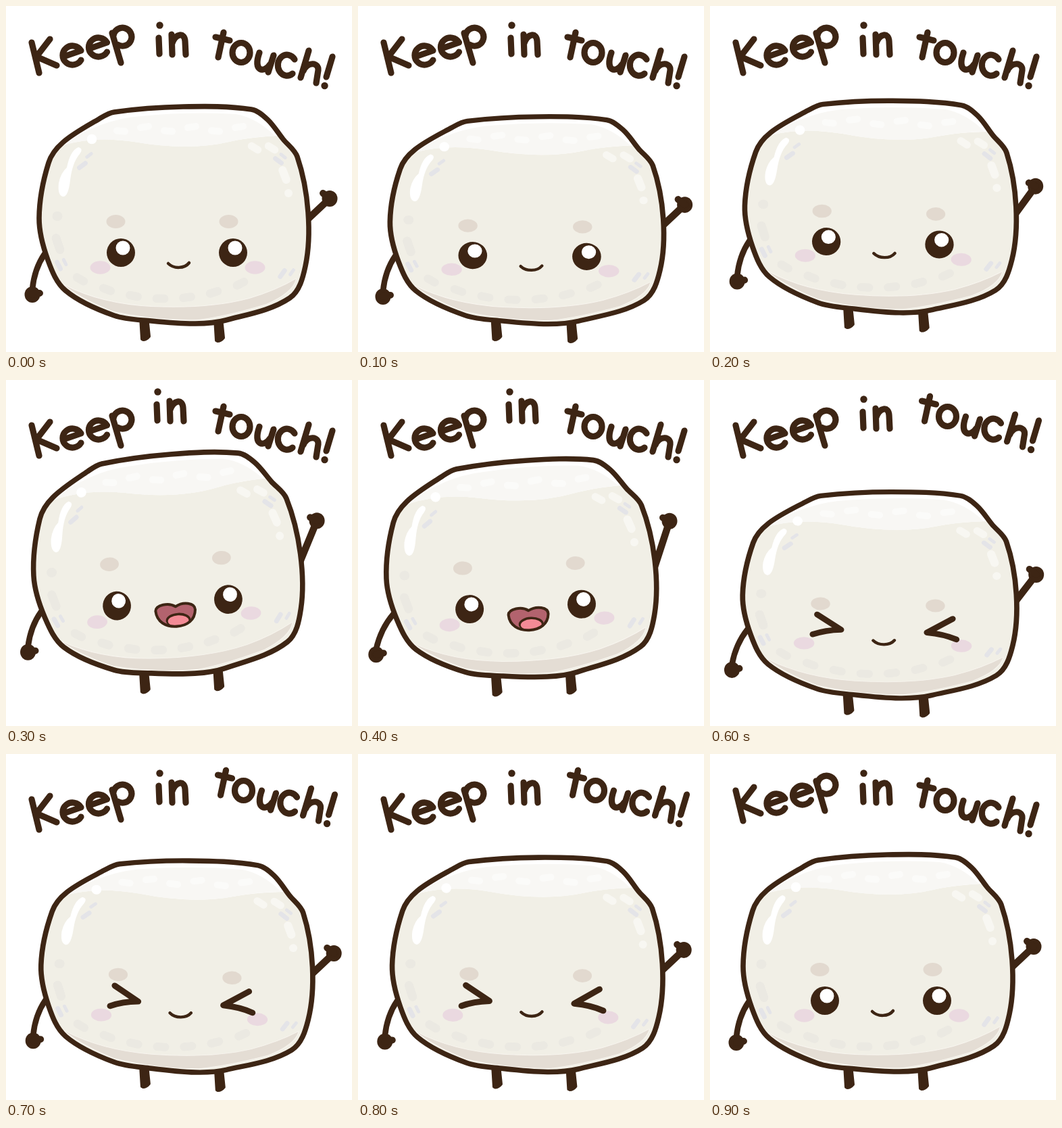
These frames come from a looping animation (512x512 px, 1 s). An HTML page with a canvas:

```html
<!DOCTYPE html>
<html lang="en">
<head>
<meta charset="utf-8">
<title>Keep in touch!</title>
<style>
html, body { margin: 0; width: 100%; height: 100%; overflow: hidden; background: #fff; }
canvas { display: block; width: 512px; height: 512px; }
</style>
</head>
<body>
<canvas id="stage" width="512" height="512" role="img" aria-label="Keep in touch!"></canvas>
<script>
const ctx = document.getElementById('stage').getContext('2d');
const INK = '#3d2514';
const STEP = 100, STEPS = 10;
const PIVOT = [250, 475];

// Hop: lift, tilt, vertical stretch; the body is at rest afterwards
const hop = [
  [0, 0, 1], [0, .01, .955], [17, .026, .976], [34, -.058, 1.015], [29.6, -.045, 1],
  [0, .003, .955], [0, .018, .95], [0, .029, .974], [0, .015, .988]
];

// Smooth rise and fall around a centre
const bump = (t, centre, half) =>
  Math.abs(t - centre) < half ? Math.cos(Math.PI * (t - centre) / (2 * half)) ** 2 : 0;

// Closed smooth curve; handles are a third of each side
function loop(pts) {
  const path = new Path2D(), n = pts.length, at = i => pts[(i + n) % n];
  const heading = i => Math.atan2(at(i + 1)[1] - at(i - 1)[1], at(i + 1)[0] - at(i - 1)[0]);
  path.moveTo(...pts[0]);
  pts.forEach(([x, y], i) => {
    const [u, v] = at(i + 1), h = Math.hypot(u - x, v - y) / 3;
    const a = heading(i), b = heading(i + 1);
    path.bezierCurveTo(x + h * Math.cos(a), y + h * Math.sin(a),
      u - h * Math.cos(b), v - h * Math.sin(b), u, v);
  });
  return path;
}

const body = loop([
  [160, 157], [262, 149], [363, 153], [387, 168], [410, 197], [431, 223], [447, 305],
  [443, 385], [420, 432], [325, 465], [280, 470], [215, 466], [160, 458], [88, 421],
  [62, 376], [49, 314], [63, 232], [84, 202], [138, 167]
]);

const capEdge = 'Q360 194 330 201 Q270 215 190 201 Q130 192 84 206 Z';
const rim = new Path2D('M84 206 V140 H404 V192 ' + capEdge);
const cap = new Path2D('M84 206 Q140 167 200 163 Q270 156 340 160 Q370 165 398 192 ' + capEdge);
const shade = new Path2D('M86 413 Q140 441 215 445 Q300 449 360 433 Q400 421 429 404 Q424 424 385 441 Q325 459 285 464 Q225 466 160 452 Q115 435 86 413 Z');
const streak = new Path2D('M107 209 Q115 211 109 219 Q98 232 95 258 Q92 283 84 282 Q76 280 78 262 Q81 247 90 239 Q95 214 107 209 Z');
const smile = new Path2D('M240 381 C248 389 264 389 271 380');
const mouth = new Path2D('M227 376 C228 367 247 364 257 371 C269 364 286 367 286 377 C285 392 273 400 257 400 C241 400 228 392 227 376 Z');
const squint = new Path2D('M158 342 L193 365 Q170 366 152 373 M355 345 L318 367 Q343 369 361 377');
const leg = new Path2D('M-6 -6 H4 L7 23 Q3 28 -2 28 L-4 27 Z');

const e = (x, y) => `M${x - 13} ${y + 4} l26 -9 a14.5 14 0 1 0 0 14 `;
const words = [
  { line: new Path2D('M38 67 L49 112 M65 62 L45 88 L75 101 ' + e(98, 84) + e(136.5, 72) +
      'M157 53 L170 97 M159 57 a13.5 13.5 0 1 1 6 13'),
    lift: [0, -13] },
  { line: new Path2D('M226 47 L227 71 M245 42 L246 72 M246 55 C251 41 264 38 265 52 L266 72'),
    dot: [227.5, 28.5], lift: [-3, -11] },
  { line: new Path2D('M322 39 L314 76 M310 46 L331 51 M335 69 a13 14.5 0 1 0 26 0 a13 14.5 0 1 0 -26 0 ' +
      'M375 69 C365 97 382 100 391 86 M396 73 L388 98 M427 79 a13.5 15.5 0 1 0 -3 21 ' +
      'M448 66 L436 106 M440 96 C447 81 463 84 462 95 L459 114 M483 75 L474 105'),
    dot: [471.5, 118], lift: [3.5, -15] }
];

function ellipse(x, y, rx, ry, color) {
  ctx.fillStyle = color;
  ctx.beginPath();
  ctx.ellipse(x, y, rx, ry, 0, 0, Math.PI * 2);
  ctx.fill();
}

function stroke(path, width, color = INK) {
  ctx.lineWidth = width;
  ctx.strokeStyle = color;
  ctx.stroke(path);
}

function fill(path, color) {
  ctx.fillStyle = color;
  ctx.fill(path);
}

function grain(x, y, w, h, angle, color) {
  ctx.save();
  ctx.translate(x, y);
  ctx.rotate(angle);
  ctx.fillStyle = color;
  ctx.beginPath();
  ctx.roundRect(-w / 2, -h / 2, w, h, h / 2);
  ctx.fill();
  ctx.restore();
}

// A long and a short mark side by side
function hatch(x, y, angle, dx, dy) {
  grain(x, y, 18, 7, angle, '#e4e4e8');
  grain(x + dx, y + dy, 13, 5, angle, '#e4e4e8');
}

function drawRice() {
  const light = 'rgba(255, 255, 255, .5)', dark = '#ebe9e2';
  for (let i = 0; i < 6; i++) {
    const odd = i % 2;
    grain(170 + 35 * i, odd ? 179 : 185, 22, 10, odd ? -.15 : .1, light);
  }
  for (let i = 0; i < 7; i++) {
    const x = 110 + 39.5 * i, off = x - 236;
    grain(x, 433 - .0018 * off * off, 24, 12.5, -.0042 * off, dark);
  }
  for (const x of [368, 393]) grain(x, 210, 22, 11, .55, light);
  grain(412, 250, 27, 12, 1.2, light);
  ellipse(418, 277, 6, 6, light);
  grain(76, 311, 15, 14, 0, dark);
  grain(77, 352, 31, 13, 1.25, dark);
  hatch(113, 236, -.65, 10, -15);
  hatch(403, 229, .65, 7, -7);
  hatch(78, 384, 1.1, 9, -5);
  hatch(409, 396, -.95, 14, -2);
}

// Turns body coordinates into stage coordinates
function bodyMatrix([lift, tilt, stretch]) {
  return new DOMMatrix()
    .translate(PIVOT[0], PIVOT[1] - lift)
    .rotate(tilt * 180 / Math.PI)
    .scale(1 + (1 - stretch) * .35, stretch)
    .translate(-PIVOT[0], -PIVOT[1]);
}

function drawHand(x, y, tx, ty) {
  ellipse(x, y, 11.5, 12, INK);
  stroke(new Path2D(`M${x} ${y} l${tx} ${ty}`), 10);
}

function drawLimbs(m, step) {
  const at = (x, y) => m.transformPoint({ x, y });
  const raise = 38 * bump(step, 3.95, 3), swing = 10 * bump(step, 4.8, 2.4);

  const left = at(57, 367), lx = left.x - 18 - swing, ly = left.y + 60;
  stroke(new Path2D(`M${left.x} ${left.y} Q${(left.x + lx) / 2 - 6} ${left.y + 22} ${lx} ${ly - 8}`), 8.5);
  drawHand(lx, ly, 11, -2);

  const right = at(446, 316), rx = right.x + 33 - .28 * raise, ry = right.y - 31 - raise;
  stroke(new Path2D(`M${right.x} ${right.y} L${rx} ${ry}`), 10.5);
  drawHand(rx, ry, -10, raise > 9 ? -5 : -8);

  for (const x of [205, 315]) {
    const hip = at(x, x < 250 ? 466 : 468);
    ctx.save();
    ctx.translate(hip.x, hip.y);
    fill(leg, INK);
    stroke(leg, 4);
    ctx.restore();
  }
}

function drawFace(step, phase) {
  const brow = 319 + [0, -15, 6][phase];
  for (const side of [-1, 1]) {
    ellipse(246 + 83.5 * side, brow, 14, 10, '#e2d9cf');
    ellipse(254 + 114.5 * side, 387, 15, 9.7, '#ead9e0');
    if (phase === 2) continue;
    const x = 253 + 83 * side;
    ellipse(x, 365, 21, 21, INK);
    ellipse(x + 3, 358, 10.5, 10.5, '#fff');
  }
  if (phase === 2) stroke(squint, 9);
  if (phase !== 1 || step === 5) return stroke(smile, 4.5);
  fill(mouth, '#b3636e');
  ctx.save();
  ctx.clip(mouth);
  ellipse(260, 391, 18.5, 10.5, INK);
  ellipse(260, 392, 15.5, 8, '#f38b96');
  ctx.restore();
  stroke(mouth, 4);
}

function drawBody(m, step, phase) {
  ctx.save();
  ctx.transform(m.a, m.b, m.c, m.d, m.e, m.f);
  fill(body, '#f1efe6');
  ctx.save();
  ctx.clip(body);
  fill(rim, '#fff');
  fill(cap, '#f8f7f4');
  stroke(shade, 2, '#f8f5ef');
  fill(shade, '#e4ddd4');
  drawRice();
  ctx.restore();
  fill(streak, '#fff');
  ellipse(127, 197, 7.3, 7.3, '#fff');
  drawFace(step, phase);
  stroke(body, 7.6);
  ctx.restore();
}

function drawWords(phase) {
  words.forEach(({ line, dot, lift }, i) => {
    ctx.save();
    if (i === phase) ctx.translate(...lift);
    stroke(line, 9.2);
    if (dot) ellipse(...dot, 5.2, 5.2, INK);
    ctx.restore();
  });
}

function frame(now) {
  const step = Math.floor(now / STEP) % STEPS;
  const phase = Math.floor(step / 3) % 3;
  const m = bodyMatrix(hop[step] || hop[0]);
  ctx.fillStyle = '#fff';
  ctx.fillRect(0, 0, 512, 512);
  ctx.lineCap = ctx.lineJoin = 'round';
  drawLimbs(m, step);
  drawBody(m, step, phase);
  drawWords(phase);
  requestAnimationFrame(frame);
}

frame(0);
</script>
</body>
</html>
```
